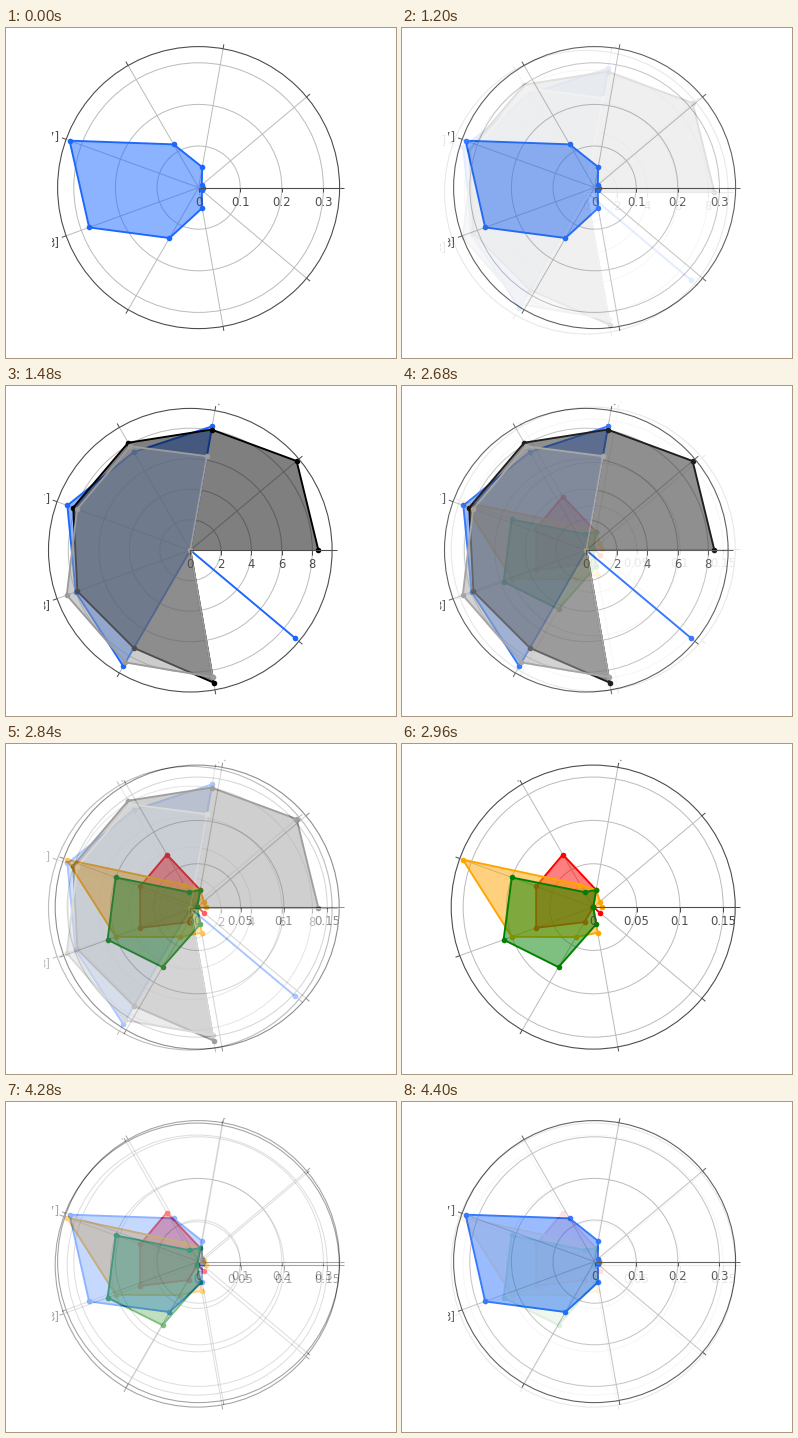
Write a matplotlib script that moves like this. It is 390x330 px and loops after 4.44 s.

```python
import numpy as np
import matplotlib.pyplot as plt
from matplotlib.animation import FuncAnimation
from matplotlib.patches import Circle, Polygon, Rectangle

W, H, DPI = 390, 330, 100
STEP = 40              # ms per frame
HOLD, FADE = 29, 8     # frames per chart: still, then cross-fade
SPAN = HOLD + FADE
PT = 72 / DPI          # points per pixel

INK, GRID = "#4c4c4c", "#bcbcbc"
BLUE, GREY = "#1b68ff", "#9b9b9b"
ANGLES = np.radians(np.arange(0, 360, 40))

plt.rcParams["font.family"] = "DejaVu Sans"
fig = plt.figure(figsize=(W / DPI, H / DPI), dpi=DPI, facecolor="white")


def stage():
    ax = fig.add_axes([0, 0, 1, 1])
    ax.set_xlim(0, W)
    ax.set_ylim(H, 0)
    ax.axis("off")
    return ax


def radar(center, radius, unit, ticks, series, label_y, brackets=(), crop=0, specks=()):
    """Polar chart in pixel coordinates; unit is pixels per data unit."""
    ax = stage()
    cx, cy = center

    def at(r, a):
        return cx + r * np.cos(a), cy - r * np.sin(a)

    def line(p, q, color, z, width=1.0):
        ax.plot([p[0], q[0]], [p[1], q[1]], color=color, lw=width * PT,
                zorder=z, solid_capstyle="butt")

    def text(x, y, s, ha):
        ax.text(x, y, s, ha=ha, va="baseline", size=11.6 * PT, color=INK, zorder=9)

    for a in ANGLES:
        line(center, at(radius, a), GRID, 1)
        line(at(radius, a), at(radius + 4.5, a), INK, 8)
    for t in ticks[1:]:
        ax.add_patch(Circle(center, float(t) * unit, fill=False, ec=GRID, lw=PT, zorder=1))

    for k, (color, values) in enumerate(series):
        x, y = at(np.array(values) * unit, ANGLES)
        z = 2 + k
        ax.add_patch(Polygon(np.c_[x, y], fc=color, alpha=0.5, lw=0, zorder=z))
        ax.plot(x, y, "-o", color=color, lw=1.9 * PT, ms=5.6 * PT, mew=0, zorder=z + 0.5)

    ax.add_patch(Circle(center, radius, fill=False, ec=INK, lw=1.1 * PT, zorder=8))
    line(center, at(radius, 0), INK, 8, 1.1)
    for t in ticks:
        x = cx + float(t) * unit
        line((x, cy), (x, cy + 4.5), INK, 8)
        text(x, label_y, t, "center")

    # axis labels are cut off at the left edge of the chart
    for x, y, s in brackets:
        text(x, y, s, "right")
    ax.add_patch(Rectangle((0, 0), crop, H, fc="white", lw=0, zorder=10))
    for x, y in specks:
        line((x, y), (x + 1.5, y + 1), "#8a8a8a", 9)
    return ax


charts = [
    radar((192.6, 159.6), 141, 416, ["0", "0.1", "0.2", "0.3"],
          [(BLUE, [.01, .01, .05, .12, .33, .28, .14, .05, .01])],
          178.2, [(53.5, 112.2, "7]"), (53.5, 218.2, "3]")], 46),
    radar((184.3, 164.2), 141.8, 15.25, ["0", "2", "4", "6", "8"],
          [(BLUE, [0, 0, 8.25, 7.43, 8.58, 8, 8.79, 0, 9]),
           ("black", [8.4, 9.1, 8.03, 8.14, 8.17, 7.88, 7.4, 8.82, 0]),
           (GREY, [0, 0, 6.26, 7.87, 7.9, 8.62, 8.5, 8.45, 0])],
          182.4, [(44.5, 116.2, "7]"), (44.5, 223.2, "3]")], 38, [(212, 18)]),
    radar((191.2, 163.1), 142, 867, ["0", "0.05", "0.1", "0.15"],
          [("red", [0, 0, .02, .07, .07, .07, .02, 0, .01]),
           ("orange", [.01, .01, .02, .03, .16, .10, .04, .03, 0]),
           ("green", [0, 0, .02, .02, .10, .11, .08, .02, 0])],
          181.4, specks=[(218, 16), (115.5, 36.5)]),
]


def snapshot(chart):
    for c in charts:
        c.set_visible(c is chart)
    fig.canvas.draw()
    return np.asarray(fig.canvas.buffer_rgba())[..., :3] / 255.0


shots = [snapshot(c) for c in charts]
for c in charts:
    c.remove()

view = stage().imshow(shots[0], extent=(0, W, H, 0), aspect="auto",
                      interpolation="nearest")


def update(i):
    n, j = divmod(i, SPAN)
    mix = max(0, j - HOLD) / FADE
    after = shots[(n + 1) % len(shots)]
    view.set_data(shots[n] * (1 - mix) + after * mix)
    return [view]


anim = FuncAnimation(fig, update, frames=SPAN * len(shots), interval=STEP,
                     repeat=True, repeat_delay=0, blit=False)
plt.show()
```
